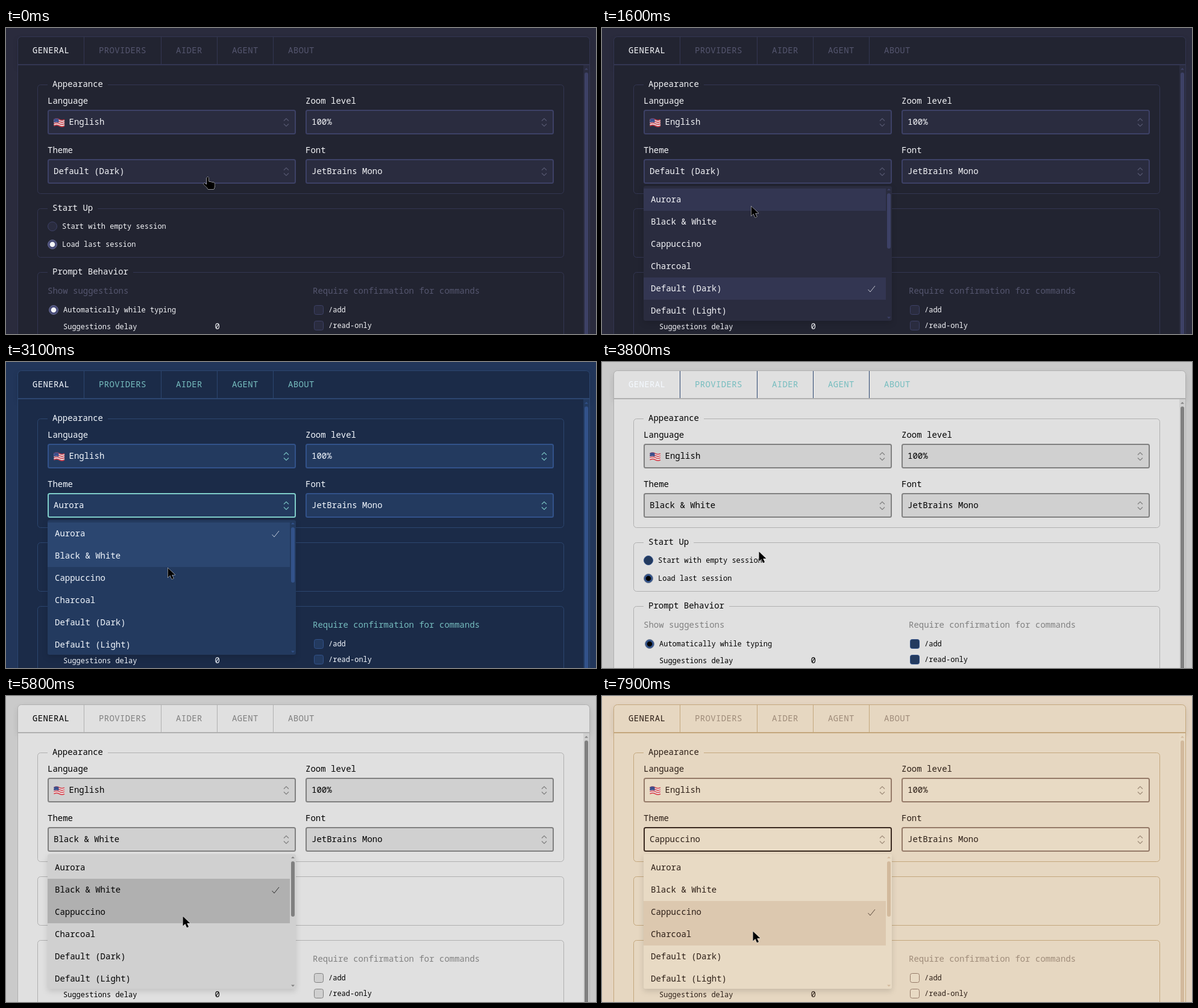
Write an HTML page that moves like this. It is 979 px wide and 509 px high and loops after 8 s.

```html
<!DOCTYPE html>
<html lang="en">
<head>
<meta charset="utf-8">
<title>Theme settings</title>
<style>
html, body { margin: 0; width: 100%; height: 100%; overflow: hidden; }
svg { display: block; width: 979px; height: 509px; background: var(--page); }
text { font: 14px "JetBrains Mono", "Noto Sans Mono", monospace; fill: var(--text); white-space: pre; }
.small { font-size: 12px; }
.muted { fill: var(--muted); }
.tab { letter-spacing: .35px; fill: var(--tab); }
.tab.active { fill: var(--tabActive); }
.sep { stroke: var(--sep); }
.line { fill: none; stroke: var(--line); }
.panel { fill: var(--panel); }
.box { fill: var(--box); }
.select { fill: var(--box); stroke: var(--edge); stroke-width: 2; }
.select.focus { stroke: var(--focus); }
.chevron { fill: none; stroke: var(--muted); stroke-width: 1.2; }
.control { fill: var(--control); stroke: var(--controlEdge); }
.control.on { fill: var(--on); stroke: var(--onEdge); }
.dot { fill: var(--text); }
.thumb { fill: var(--thumb); }
.hover { fill: var(--hover); }
.check { fill: none; stroke: var(--text); opacity: .75; }
.shadow { filter: drop-shadow(0 4px 5px #0002); }
.cursor { stroke: #fff; stroke-linejoin: round; paint-order: stroke; }
</style>
</head>
<body>
<svg id="stage" viewBox="0 0 979 509"></svg>
<script>
const LOOP = 8000, STEP = 100, FADE = 150;
const ROW_TOP = 267, ROW_H = 37;
const options = ['Aurora', 'Black & White', 'Cappuccino', 'Charcoal', 'Default (Dark)', 'Default (Light)'];

const themes = {
  'Default (Dark)': { page: '#2a2b3d', panel: '#222431', box: '#2a2c3f', edge: '#3d4166', line: '#333652', hover: '#333652',
    muted: '#55566f', text: '#f4f5f8', focus: '#62668c', thumb: '#3d4166', on: '#484c78', onEdge: '#676b94' },
  'Aurora': { page: '#22365a', panel: '#1b2b48', box: '#233a5f', edge: '#32528a', line: '#2c4670', hover: '#2b4670',
    muted: '#76bdbf', text: '#f4f9ff', focus: '#7fcdc9', thumb: '#32528a', on: '#32528a', onEdge: '#7a8494' },
  'Black & White': { page: '#cacaca', panel: '#e0e0e0', box: '#d0d0d0', edge: '#808080', line: '#b0b0b0', hover: '#b0b0b0',
    muted: '#808080', text: '#000000', focus: '#404040', thumb: '#808080', on: '#b0b0b0', onEdge: '#505050' },
  'Cappuccino': { page: '#e4d4c1', panel: '#e6d7c1', box: '#e8dac4', edge: '#957a68', line: '#c4a77d', hover: '#dcc8af',
    muted: '#9f8c7a', text: '#2c1e16', focus: '#3b2a20', thumb: '#d2b99c', on: '#c4aa8c', onEdge: '#4f3a2c' }
};

// Each visit to the menu: focus, open, press, pick
const visits = [
  { focus: 400, open: 500, press: 1500, pick: 1700, theme: 'Aurora' },
  { focus: 2400, open: 2500, press: 3600, pick: 3800, theme: 'Black & White' },
  { focus: 4900, open: 4900, press: 5800, pick: 6000, theme: 'Cappuccino' },
  { focus: 7200, open: 7300, press: Infinity, pick: Infinity }
];

// Pointer path: time, x, y
const path = [
  [0, 335, 247], [100, 335, 247], [200, 334, 242], [600, 334, 242], [700, 325, 264], [800, 295, 296],
  [1000, 258, 320], [1100, 258, 320], [1300, 248, 297], [1500, 248, 297], [1600, 247, 296], [1700, 247, 296],
  [2000, 300, 238], [2700, 300, 238], [2800, 296, 262], [3100, 268, 342], [3300, 264, 354], [3600, 260, 315],
  [3800, 260, 315], [4100, 300, 227], [5000, 300, 227], [5100, 298, 262], [5400, 294, 368], [5500, 294, 368],
  [5600, 293, 366], [6000, 293, 366], [6400, 315, 238], [7300, 315, 238], [7700, 256, 380], [7900, 250, 391]
];

const escape = s => s.replace('&', '&amp;');
const text = (x, y, s, cls = '') => `<text x="${x}" y="${y}" class="${cls}">${escape(s)}</text>`;
const rect = (x, y, w, h, cls, r = 0, more = '') =>
  `<rect x="${x}" y="${y}" width="${w}" height="${h}" rx="${r}" class="${cls}" ${more}/>`;
const shape = (d, cls, more = '') => `<path d="${d}" class="${cls}" ${more}/>`;

const select = (x, y, value, id = '', indent = 0) =>
  rect(x + 1, y + 1, 410, 39, 'select', 2.5, id && `id="${id}Box"`) +
  `<text x="${x + 10 + indent}" y="${y + 25}" id="${id}">${value}</text>` +
  shape(`M${x + 392} ${y + 18.5}l4-4 4 4m-8 5l4 4 4-4`, 'chevron');

const fieldset = (y, h, title) =>
  rect(52.5, y, 873, h, 'line', 5) +
  rect(69, y - 2, title.length * 8.4 + 16, 4, 'panel') + text(77, y + 3.5, title);

const radio = (x, y, on) =>
  `<circle cx="${x}" cy="${y}" r="7.5" class="control ${on ? 'on' : ''}"/>` +
  (on ? `<circle cx="${x}" cy="${y}" r="4.3" class="dot"/>` : '');

const checkbox = (y, label) => rect(511.5, y - 7.5, 15, 15, 'control', 3) + text(535, y + 4, label, 'small');

const flag = () => {
  const wave = 'q4.5-2.5 9 0t8.5 0';
  let s = '';
  for (let i = 0; i < 7; i++)
    s += shape(`M79.5 ${152.5 + i * 1.7}${wave}`, '', `fill="none" stroke-width="1.8" stroke="${i % 2 ? '#eee' : '#d8434e'}"`);
  return s + shape('M79.5 151.5q4-2 8 0v6q-4-2-8 0z', '', 'fill="#3c4f8c"');
};

const tabs = [[44, 'GENERAL'], [154, 'PROVIDERS'], [282, 'AIDER'], [375, 'AGENT'], [468, 'ABOUT']];

const page =
  rect(20, 15, 948, 48, 'panel shadow', 6) +
  rect(19.5, 14.5, 949, 520, 'panel', 6) +
  rect(958, 62, 10, 447, 'box') + rect(960, 74, 6, 460, 'thumb', 3) + shape('M960 69.5l3-3 3 3z', 'thumb') +
  rect(19.5, 14.5, 949, 520, 'line', 6) +
  shape('M20 61H968', 'line', 'stroke-width="2"') +
  tabs.map(([x, s], i) => text(x, 42, s, i ? 'tab' : 'tab active') +
    (i ? shape(`M${x - 24.5} 15V60`, 'sep') : '')).join('') +
  fieldset(94.5, 181, 'Appearance') +
  text(69, 126, 'Language') + text(497, 126, 'Zoom level') + text(69, 208, 'Theme') + text(497, 208, 'Font') +
  select(69, 136, 'English', '', 25.5) + flag() + select(497, 136, '100%') +
  select(69, 218, '', 'theme') + select(497, 218, 'JetBrains Mono') +
  fieldset(300.5, 81, 'Start Up') +
  radio(77, 330) + text(93, 334, 'Start with empty session', 'small') +
  radio(77, 360, true) + text(93, 364, 'Load last session', 'small') +
  fieldset(406.5, 200, 'Prompt Behavior') +
  text(69, 442, 'Show suggestions', 'muted') + text(509, 442, 'Require confirmation for commands', 'muted') +
  radio(79, 469, true) + text(95, 473, 'Automatically while typing', 'small') +
  text(95, 501, 'Suggestions delay', 'small') + text(346.5, 501, '0') +
  checkbox(469, '/add') + checkbox(495, '/read-only');

const menu = '<g id="menu">' +
  rect(69, 263, 412, 224, 'box shadow', 3) +
  rect(69, 0, 402, ROW_H, 'hover', 0, 'id="chosen"') + rect(69, 0, 402, ROW_H, 'hover', 0, 'id="hovered"') +
  options.map((s, i) => text(81, ROW_TOP + ROW_H * i + 23, s)).join('') +
  shape('M441.5 20l3.5 4 8-10', 'check', 'id="check"') +
  rect(473, 275, 6, 92, 'thumb', 3) + shape('M473 270l3-3 3 3zM473 480.5l3 3 3-3z', 'thumb') + '</g>';

const pointers =
  shape('M.5.5V16.5l3.8-3.5 2.8 6.2 3-1.3-2.8-6H12.5z', 'cursor', 'id="arrow"') +
  shape('M-.5 1c1 0 2 .6 2 2v5.5l8 1.5c1.5.4 2 1.2 2 2.5v3l-1.5 5.5H0l-1-2L-7.2 13c-.5-1.5 1-2.5 2.5-1.5l2.7 2V3c0-1.2.6-2 1.5-2z',
    'cursor', 'id="hand"');

const stage = document.getElementById('stage');
stage.innerHTML = page + menu + pointers;
const el = id => document.getElementById(id);
const show = (id, on) => el(id).style.display = on ? '' : 'none';
const move = (id, x, y) => el(id).setAttribute('transform', `translate(${x} ${y})`);

function pointerAt(t) {
  const i = path.findIndex(p => p[0] > t);
  if (i < 1) return path[i ? path.length - 1 : 0].slice(1);
  const [t0, x0, y0] = path[i - 1], [t1, x1, y1] = path[i];
  const k = (t - t0) / (t1 - t0);
  return [Math.round(x0 + (x1 - x0) * k), Math.round(y0 + (y1 - y0) * k)];
}

function applyTheme(now, before, age) {
  const a = themes[before], b = themes[now];
  const p = Math.min(1, age / FADE), k = p * p * (3 - 2 * p) * 100;
  const set = (name, value) => stage.style.setProperty('--' + name, value);
  const fade = (name, key) => set(name, `color-mix(in srgb, ${b[key]} ${k}%, ${a[key]})`);
  for (const key in b) set(key, b[key]);
  // Tabs and form controls change colour gradually
  fade('tab', 'muted');
  fade('tabActive', 'text');
  fade('sep', 'line');
  fade('control', 'box');
  fade('controlEdge', 'edge');
  fade('on', 'on');
  fade('onEdge', 'onEdge');
}

function draw(t) {
  let now = 'Default (Dark)', before = now, age = LOOP;
  for (const v of visits) if (t >= v.pick) [before, now, age] = [now, v.theme, t - v.pick];
  applyTheme(now, before, age);

  const open = visits.some(v => t >= v.open && t < v.pick);
  el('theme').textContent = now;
  el('themeBox').classList.toggle('focus', visits.some(v => t >= v.focus && t < v.press));
  show('menu', open);

  const chosenY = ROW_TOP + ROW_H * options.indexOf(now);
  move('chosen', 0, chosenY);
  move('check', 0, chosenY);
  // Row hover trails the pointer by one step
  const row = Math.floor((pointerAt(t - STEP)[1] - ROW_TOP) / ROW_H);
  show('hovered', row >= 0);
  move('hovered', 0, ROW_TOP + ROW_H * row);

  const [x, y] = pointerAt(t);
  const onSelect = y >= 218 && y < 259;
  show('hand', onSelect);
  show('arrow', !onSelect);
  move('hand', x, y);
  move('arrow', x, y);
}

const start = performance.now();
let last = -1;
function tick() {
  const t = Math.floor((performance.now() - start) % LOOP / STEP) * STEP;
  if (t !== last) draw(last = t);
  requestAnimationFrame(tick);
}
tick();
</script>
</body>
</html>
```
